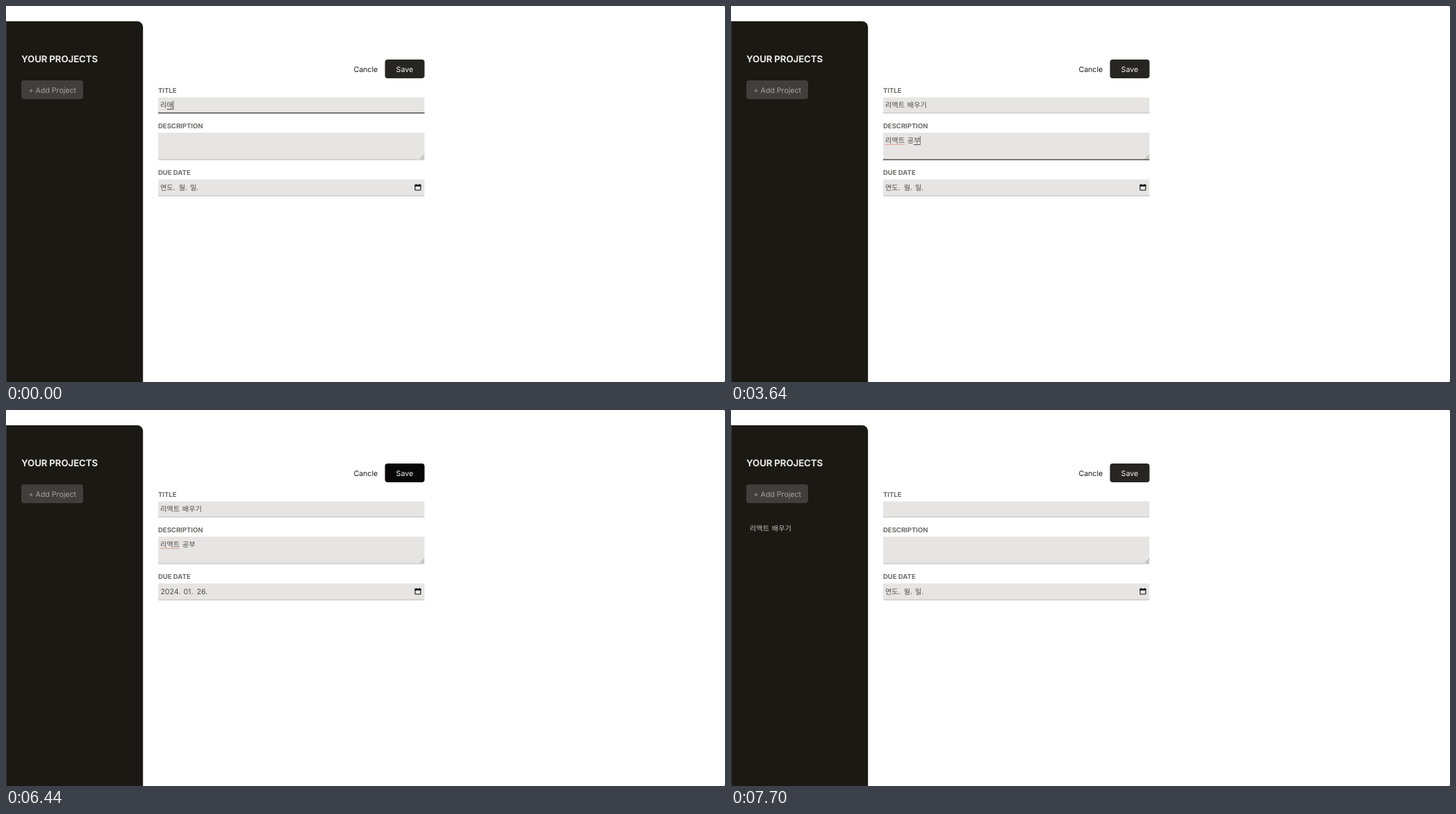
An HTML page for the animation above (8000 ms loop, 1035x541 px).

```html
<!DOCTYPE html>
<html lang="ko">
<head>
<meta charset="utf-8">
<title>Projects</title>
<style>
html, body { margin: 0; width: 100%; height: 100%; overflow: hidden; background: #fff; }
svg { display: block; width: 1035px; height: 541px; }
text { font-family: Inter, "Noto Sans CJK KR", "Noto Sans CJK", sans-serif; font-size: 10.6px; text-rendering: geometricPrecision; white-space: pre; }
.ko { font-family: "Noto Sans CJK KR", "Noto Sans CJK", sans-serif; font-size: 10.2px; word-spacing: .8px; }
.head { font-size: 13.3px; font-weight: 700; letter-spacing: -.01em; }
.label { font-size: 9.5px; font-weight: 700; }
.cal text { font-size: 8px; font-weight: 500; }
.cal .bold { font-weight: 700; }
.mid { text-anchor: middle; }
</style>
</head>
<body>
<svg id="stage" viewBox="0 0 1035 541"></svg>
<script>
const LOOP = 8000;
const stage = document.getElementById('stage');

// What is typed from each moment on
const titleKeys = [[0, '리애'], [140, '리액'], [350, '리액ㅌ'], [420, '리액트'], [490, '리액트 '],
  [700, '리액트 ㅂ'], [980, '리액트 배'], [1120, '리액트 뱅'], [1330, '리액트 배우'],
  [1470, '리액트 배욱'], [1540, '리액트 배우기'], [7700, '']];
const noteKeys = [[0, ''], [2310, 'ㄹ'], [2380, '리'], [2450, '링'], [2520, '리애'], [2590, '리액'],
  [2870, '리액ㅌ'], [2940, '리액트'], [3080, '리액트 '], [3150, '리액트 ㄱ'], [3220, '리액트 고'],
  [3360, '리액트 공'], [3570, '리액트 공ㅂ'], [3640, '리액트 공부'], [7700, '']];
const at = (keys, t) => keys.filter(k => k[0] <= t).pop()[1];
const between = (t, a, b) => t >= a && t < b;

const rect = (x, y, w, h, fill, r = 0, more = '') =>
  `<rect x="${x}" y="${y}" width="${w}" height="${h}" rx="${r}" fill="${fill}" ${more}/>`;
const text = (x, y, s, fill, cls = '') => `<text x="${x}" y="${y}" fill="${fill}" class="${cls}">${s}</text>`;
const path = (d, stroke, w = 1, fill = 'none') =>
  `<path d="${d}" stroke="${stroke}" stroke-width="${w}" fill="${fill}"/>`;
const width = s => [...s].reduce((w, c) => w + (c === ' ' ? 3.1 : 9.4), 0);

function sidebar(hasProject) {
  return path('M0 22H189a8.2 8.2 0 0 1 8.2 8.2V541H0Z', 'none', 0, '#1a1914') +
    rect(0, 23, .5, 518, '#5c5b57') +
    text(22, 80.5, 'YOUR PROJECTS', '#e7e6e3', 'head') +
    rect(22, 107, 89, 27, '#403f3b', 4) +
    text(32.6, 124.7, '+ Add Project', '#a5a49f') +
    (hasProject ? text(27, 173.6, '리액트 배우기', '#c4c3bf', 'ko') : '');
}

function field(y, h, label, focused) {
  return text(219, y - 6.4, label, '#6e6d68', 'label') +
    rect(219, y, 383.4, h, '#e6e5e3', 1.4) +
    rect(219, y + h - 1.4, 383.4, 1.4, focused ? '#4b4a46' : '#cfcecb');
}

function typed(y, s, focused, spell, caret) {
  const end = 222 + width(s);
  const composing = focused && s && !s.endsWith(' ');
  return text(222, y, s, '#4f4e4a', 'ko') +
    (spell ? `<path d="M222 ${y + 2.3}H250" stroke="#dd6a63" stroke-width="1.1" stroke-dasharray="1.2 .9"/>` : '') +
    (composing ? rect(end - 9.2, y + 2, 9.4, 1, '#4f4e4a') : '') +
    (focused && caret ? rect(end - .2, y - 9.8, .8, 12.2, '#4f4e4a') : '');
}

function form(t) {
  const title = at(titleKeys, t), note = at(noteKeys, t);
  const inTitle = t < 1750, inNote = between(t, 1750, 4550);
  const picked = between(t, 5810, 7700);
  const date = picked ? [[222.4, '2024.'], [255.4, '01.'], [274.6, '26.']]
                      : [[222, '연도.'], [248.7, '월.'], [265, '일.']];
  return text(500.4, 94.6, 'Cancle', '#1a1914') +
    rect(545.5, 77, 57, 27, between(t, 6440, 6720) ? '#080705' : '#262522', 4) +
    text(561.6, 94.6, 'Save', '#f5f5f4') +
    field(131.6, 23, 'TITLE', inTitle) +
    typed(146, title, inTitle, inTitle && t >= 490, true) +
    field(182.2, 39.6, 'DESCRIPTION', inNote) +
    typed(197, note, inNote, between(t, 3080, 7700), t < 4130) +
    path('M596.5 220 602 214.5M599.5 220.2 602 217.7', '#6b6b6b', .8) +
    field(249.4, 24.4, 'DUE DATE', false) +
    date.map(([x, s]) => text(x, 264.9, s, '#4f4e4a', picked ? '' : 'ko')).join('') +
    rect(588.9, 257.6, 8, 7.4, 'none', .6, 'stroke="#111" stroke-width="1.1"') +
    rect(588.4, 257, 9, 2.6, '#111') +
    path('M590.5 256V258M595.3 256V258', '#111', 1.1);
}

function calendar(t) {
  const colX = i => 236 + 19.18 * i, rowY = j => 334.8 + 19.2 * j;
  const hover10 = between(t, 5250, 5320), onToday = t >= 5670;
  const faded = t < 4620 || t >= 5810;
  let s = `<g class="cal" opacity="${faded ? .5 : 1}">` +
    rect(219, 274, 149.4, 192.4, '#fff', 0,
      'stroke="#a9a9a9" stroke-width=".8" style="filter:drop-shadow(0 2px 4px #0005)"') +
    text(226.4, 292.4, '2024년 1월', '#111', 'bold') +
    path('M268.3 288.2H273.7L271 291.2Z', 'none', 0, '#111') +
    path('M329 296V285M324.2 289.8 329 285 333.8 289.8M351 284.5V295.5M346.2 290.7 351 295.5 355.8 290.7', '#333');
  [...'일월화수목금토'].forEach((d, i) => s += text(colX(i), 317.8, d, '#111', 'mid'));
  for (let k = 0; k < 42; k++) {
    const x = colX(k % 7), y = rowY(Math.floor(k / 7));
    const day = k === 0 ? 31 : k > 31 ? k - 31 : k;
    const today = k === 26, hover = k === 41 && hover10;
    if (today || hover)
      s += rect(x - 9.4, y - 9.5, 18.8, 18.8, today ? '#0a74f5' : '#b5d1f7', 1,
        hover || onToday ? 'stroke="#33475f" stroke-width="1"' : '');
    const fill = today ? '#fff' : hover ? '#66809f' : k === 0 || k > 31 ? '#757575' : '#111';
    s += text(x, y + 2.9, day, fill, today ? 'mid bold' : 'mid');
  }
  return s + text(234, 454.6, '삭제', '#2276cc') +
    text(338.8, 454.6, '오늘', onToday ? '#0c4f96' : '#2276cc') + '</g>';
}

function clipboard() {
  return path('M543 101 548 97 566 130 558 132Z', 'none', 0, '#e0d5c0') +
    path('M547.5 93.5 571 88.5 586 121.5 562.5 130Z', '#4b4236', 1.6, '#4b4236') +
    path('M548.8 95.2 569.5 90 583.2 120.6 562.4 127.6Z', 'none', 0, '#f1e6cf') +
    path('M553.5 93.3 555 89.6 558.2 87.6 561.5 88.2 566 89.5 567.2 92.2 555 95.6Z', 'none', 0, '#453d33') +
    path('M555 101 569 97.3M556.8 104.7 567 102M560.4 112.8 571 110M562 116.5 575 113', '#a99b82', .8) +
    path('M572.2 110.8 583.8 96.2', '#38322b', 3.2) +
    path('M570 113.8 572.2 110.8M583.8 96.2 585.6 94', '#38322b', 1.4);
}

function emptyPage(t) {
  const hover = t >= 7140;
  return clipboard() +
    text(563.8, 157.2, 'No Project Seleted.', '#64635e', 'head mid') +
    text(563.9, 184.8, 'Select a project or get started with a new one.', '#9d9c97', 'mid') +
    rect(506.3, 211, 115.6, 27.2, hover ? '#52514d' : '#403f3b', 4) +
    text(564, 228.7, 'Create new project', hover ? '#f5f5f4' : '#a5a49f', 'mid');
}

function scene(t) {
  return sidebar(t >= 6720) +
    (between(t, 6720, 7700) ? emptyPage(t) : form(t)) +
    (between(t, 4550, 5880) ? calendar(t) : '') +
    path('M1033.5 0H1035V1.5ZM1035 539.5V541H1033.5Z', 'none', 0, '#777');
}

let last = '';
function frame() {
  const next = scene(performance.now() % LOOP);
  if (next !== last) stage.innerHTML = last = next;
  requestAnimationFrame(frame);
}
frame();
</script>
</body>
</html>
```
